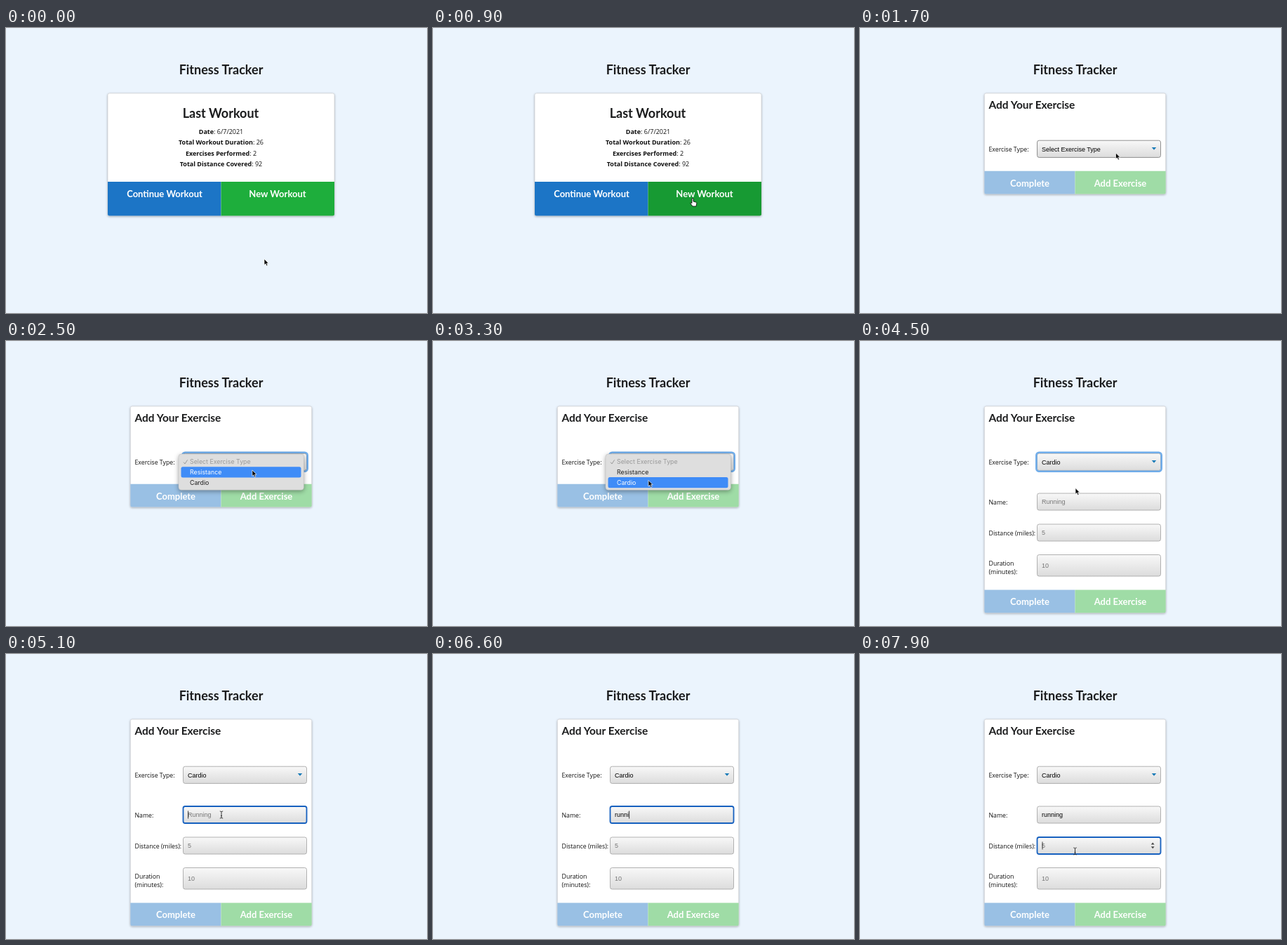
Animation of 600 by 406 pixels, one loop 8000 ms. Source, as an HTML page:

```html
<!DOCTYPE html>
<html lang="en">
<head>
<meta charset="utf-8">
<title>Fitness Tracker</title>
<style>
  html, body { margin: 0; width: 100%; height: 100%; overflow: hidden; background: #ebf4fd; }
  svg { display: block; width: 600px; height: 406px; }
  text { white-space: pre; }
  .h { font-family: Lato, sans-serif; font-weight: 700; fill: #1b1c1d; }
  .b { font-family: "Open Sans", "Noto Sans", sans-serif; fill: #111; }
  .f { font: 9px "Liberation Sans", Arial, sans-serif; fill: #000; }
  .m { font: 8.8px Inter, sans-serif; fill: #1e1e1e; }
  .mid { text-anchor: middle; }
  .bold { font-weight: 700; }
  .card { fill: #fff; stroke: #d0d2d5; stroke-width: .7; filter: drop-shadow(0 1px 1.6px rgba(0, 0, 0, .28)); }
  .menu { fill: #dedede; stroke: #bdbdbd; stroke-width: .5; filter: drop-shadow(0 2px 3px rgba(0, 0, 0, .35)); }
</style>
</head>
<body>
<svg viewBox="0 0 600 406">
  <defs>
    <linearGradient id="field" x1="0" y1="0" x2="0" y2="1">
      <stop offset="0" stop-color="#f8f8f8"/>
      <stop offset="1" stop-color="#dcdcdc"/>
    </linearGradient>
  </defs>
  <g id="stage"></g>
</svg>
<script>
const LOOP = 8000, STEP = 100;
const BLUE = '#1c75c6', GREEN = '#1eae3c', GREEN_HOVER = '#179a33';
const PALE_BLUE = '#99c0e4', PALE_GREEN = '#9fdca6';
const stage = document.getElementById('stage');
const pen = document.createElement('canvas').getContext('2d');
pen.font = '9px "Liberation Sans", Arial, sans-serif';

// Pointer stops: time, x, y
const path = [
  [0, 368, 329], [900, 370, 243], [1400, 370, 241], [1700, 364.5, 178],
  [2200, 364.5, 178], [3100, 312, 201], [3300, 307, 198.5], [4300, 307, 199],
  [4800, 307, 229], [7400, 307, 229], [7700, 306.5, 281], [LOOP, 306.5, 281]
];
// Typed letters: time, value
const typed = [[5800, 'r'], [6000, 'ru'], [6200, 'run'], [6400, 'runn'],
  [6600, 'runni'], [6900, 'runnin'], [7100, 'running']];

const text = (x, y, str, cls, attrs = '') => `<text x="${x}" y="${y}" class="${cls}" ${attrs}>${str}</text>`;
const head = (x, y, str, size, cls = 'mid') => text(x, y, str, 'h ' + cls, `font-size="${size}"`);
const label = (y, str) => text(183.5, y, str, 'b', 'font-size="8.75"');
const white = (x, y, str) => text(x, y, str, 'h mid', 'font-size="13" style="fill:#fff"');
const rect = (x, y, w, h, r, attrs) => `<rect x="${x}" y="${y}" width="${w}" height="${h}" rx="${r}" ${attrs}/>`;

function pointerAt(t) {
  const i = path.findIndex((p, k) => k && t <= p[0]);
  const [t0, x0, y0] = path[i - 1], [t1, x1, y1] = path[i];
  const u = (t - t0) / (t1 - t0), e = u * u * (3 - 2 * u);
  return [x0 + (x1 - x0) * e, y0 + (y1 - y0) * e];
}

function card(x, right, top, bottom, left, second) {
  const mid = (x + right) / 2, r = 2.5;
  return rect(x, 93, right - x, bottom - 93, r, 'class="card"') +
    `<path d="M${x} ${top}H${mid}V${bottom}H${x + r}q${-r} 0 ${-r} ${-r}z" fill="${left}"/>` +
    `<path d="M${mid} ${top}H${right}V${bottom - r}q0 ${r} ${-r} ${r}H${mid}z" fill="${second}"/>`;
}

function summary(hover) {
  const rows = [['Date', '6/7/2021'], ['Total Workout Duration', 26],
    ['Exercises Performed', 2], ['Total Distance Covered', 92]];
  return card(145, 468, 219, 267.5, BLUE, hover ? GREEN_HOVER : GREEN) +
    head(306, 127.5, 'Last Workout', 18) +
    rows.map(([k, v], i) => text(306.5, 150.5 + i * 15.5,
      `<tspan class="bold">${k}</tspan>: ${v}`, 'b mid', 'font-size="9"')).join('') +
    white(226, 241, 'Continue Workout') + white(387, 241, 'New Workout');
}

function field(y, h, str, { focus, ghost, hover } = {}) {
  const line = focus ? 'stroke="#1660bf" stroke-width="1.8"' : `stroke="${hover ? '#858585' : '#a9a9a9'}" stroke-width=".9"`;
  return rect(252.5, y, 176, h, 2.8, `fill="url(#field)" ${line}`) +
    text(259, y + h / 2 + 3.2, str, 'f', ghost ? 'style="fill:#757575"' : '');
}

function select(str, ring, hover) {
  const halo = ring ? rect(251.3, 158.8, 178.4, 26.9, 4, 'fill="none" stroke="#70adea" stroke-width="2.6"') : '';
  return field(160.2, 24.2, str, { hover }) + halo +
    '<path d="M415.8 170H422.2L419 173.8z" fill="#1a7bb8"/>';
}

const caret = (x, y) => `<path d="M${x} ${y - 5.5}v11" stroke="#111" stroke-width=".8"/>`;

function cardioFields(t) {
  const name = (typed.filter(k => k[0] <= t).pop() || [0, ''])[1];
  const onName = t >= 5000 && t < 7800, onDistance = t >= 7800;
  // The caret rests solid after each key, then blinks
  const last = Math.max(5000, ...typed.filter(k => k[0] <= t).map(k => k[0]));
  const lit = (t - last) % 1000 < 500;
  let out = label(232.5, 'Name:') + label(276.5, 'Distance (miles):') +
    label(320.3, 'Duration') + label(332.3, '(minutes):') +
    field(217, 24, name || 'Running', { focus: onName, ghost: !name }) +
    field(261, 24, '5', { focus: onDistance, ghost: true }) +
    field(304.5, 30.5, '10', { ghost: true });
  if (onName && lit) out += caret(259.6 + pen.measureText(name).width, 229);
  if (onDistance) out += caret(260, 273);
  if (t >= 7600) out += '<path d="M414.8 271.6l2.4-3 2.4 3zM414.8 274.2l2.4 3 2.4-3z" fill="#444"/>';
  return out;
}

function menu(y, t) {
  const lit = t === 3900 ? 0 : y >= 194 ? 2 : y >= 179.5 ? 1 : 0;
  const bar = lit ? rect(249.5, 179.2 + (lit - 1) * 14.8, 171, 15.2, 2.5, 'fill="#3f8cf7"') : '';
  const ink = i => lit === i ? 'style="fill:#fff"' : '';
  return `<g opacity="${t >= 4100 ? .45 : 1}">` + rect(246, 161, 178.4, 51.2, 4, 'class="menu"') + bar +
    '<path d="M253 172.6l2 2.4 3.6-5.6" fill="none" stroke="#999" stroke-width="1"/>' +
    text(262, 175.3, 'Select Exercise Type', 'm', 'style="fill:#999"') +
    text(262, 190.2, 'Resistance', 'm', ink(1)) + text(262, 205, 'Cardio', 'm', ink(2)) + '</g>';
}

function form(t, x, y) {
  const cardio = t >= 4400, bottom = cardio ? 387.3 : 236.5, top = bottom - 32.7;
  const ring = t >= 2000 && t < 5000;
  const hover = !cardio && y > 160 && y < 185;
  return card(177.3, 435.7, top, bottom, PALE_BLUE, PALE_GREEN) +
    head(183.5, 114.8, 'Add Your Exercise', 15.43, '') + label(176, 'Exercise Type:') +
    select(cardio ? 'Cardio' : 'Select Exercise Type', ring, hover) +
    (cardio ? cardioFields(t) : '') +
    white(242, top + 21.7, 'Complete') + white(371, top + 21.7, 'Add Exercise') +
    (t >= 2000 && t < 4200 ? menu(y, t) : '');
}

function pointer(t, x, y) {
  if (t >= 5800 && t < 7400) return '';
  const at = d => `<g transform="translate(${x.toFixed(2)} ${y.toFixed(2)})">${d}</g>`;
  if (t < 1000 && y > 219 && y < 267.5)
    return at('<path d="M-1 0q1-1.2 2 0V4l4 1.2q1 .4.8 1.6L5 11H0L-3 7q-.6-1.4.8-1.2L-1 6.6z" fill="#fff" stroke="#000" stroke-width=".8"/>');
  const inField = t >= 4400 && ((y > 217 && y < 241) || (y > 261 && y < 285));
  if (inField)
    return at('<path d="M-2.2-5q1.8 0 2.2 1Q.4-5 2.2-5M0-4V4M-2.2 5q1.8 0 2.2-1Q.4 5 2.2 5M-1 1.6h2" fill="none" stroke="#222" stroke-width=".9"/>');
  return at('<path d="M0 0V8.6L2 6.8 3.4 10 5 9.3 3.6 6.2H6.2z" fill="#000" stroke="#fff" stroke-width=".7"/>');
}

function draw(t) {
  const [x, y] = pointerAt(t);
  stage.innerHTML = head(306.5, 66, 'Fitness Tracker', 18) +
    (t < 1000 ? summary(y > 219 && y < 267.5) : form(t, x, y)) + pointer(t, x, y);
}

let shown = -1;
const start = performance.now();
function tick() {
  const t = Math.floor(((performance.now() - start) % LOOP) / STEP) * STEP;
  if (t !== shown) draw(shown = t);
  requestAnimationFrame(tick);
}
tick();
</script>
</body>
</html>
```
